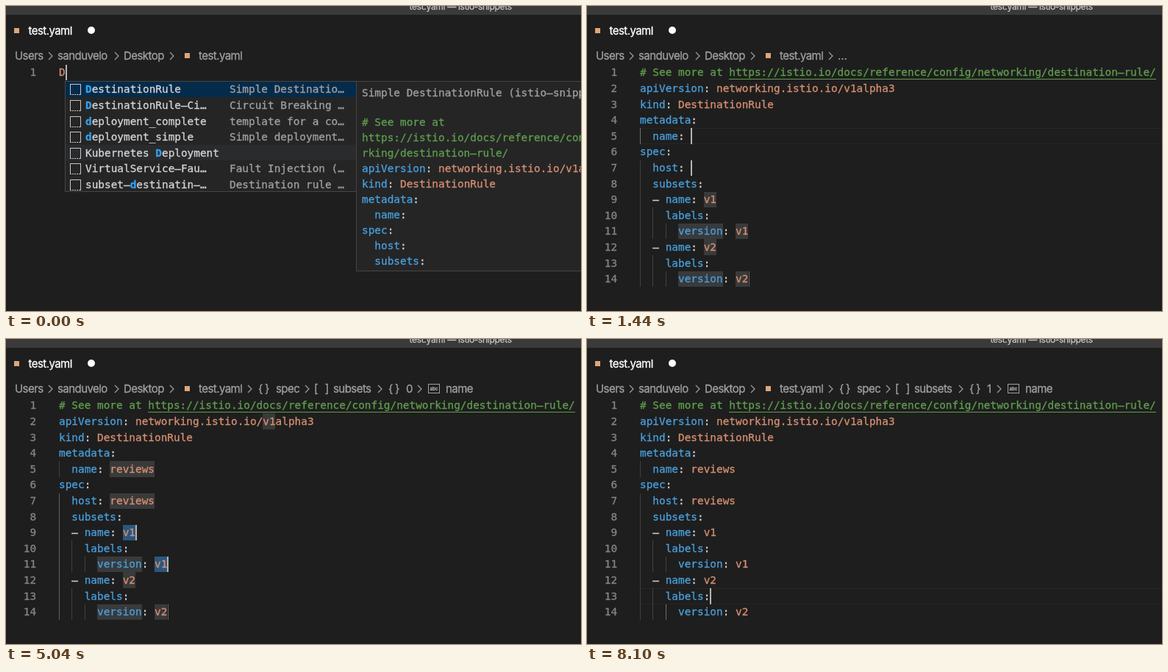
An HTML page with a canvas for the animation above (8160 ms loop, 782 px wide and 415 px high).

```html
<!DOCTYPE html>
<html lang="en">
<head>
<meta charset="utf-8">
<title>YAML snippet editor</title>
<style>
html, body { margin: 0; width: 100%; height: 100%; overflow: hidden; background: #1e1e1e; }
canvas { display: block; }
</style>
</head>
<body>
<canvas id="stage" width="782" height="415"></canvas>
<script>
const ctx = document.getElementById('stage').getContext('2d');
const LOOP = 8160, CELL = 8.668, ROW = 21.6, LEFT = 72, TOP = 79.4;
const CODE = '14.4px "DejaVu Sans Mono", monospace';
const UI = '15px Inter, sans-serif';
const BLUE = '#489fdc', ORANGE = '#d68f70', GREEN = '#5f9d4c', WHITE = '#d4d4d4', GREY = '#a0a0a0';
const MARK = '#393a3b';

// Moments at which the editor changes state
const T = { insert: 420, link: 780, crumbs: 2400, v1: 4740, v2: 6240, done: 7620, up: 7980 };
const KEYS = [2280, 2460, 2640, 2940, 3120, 3240, 3300];

const colX = col => LEFT + col * CELL;
const rowY = row => Math.ceil(TOP + (row - 1) * ROW);
const rowH = row => rowY(row + 1) - rowY(row);
const baseline = (first, i) => Math.ceil(first + i * ROW);

function rect(x, y, w, h, color) {
  ctx.fillStyle = color;
  ctx.fillRect(x, y, w, h);
}

function frame(x, y, w, h, color) {
  ctx.strokeStyle = color;
  ctx.lineWidth = 1;
  ctx.strokeRect(x + .5, y + .5, w - 1, h - 1);
}

function path(points, color, width) {
  ctx.beginPath();
  points.forEach(([x, y]) => ctx.lineTo(x, y));
  ctx.strokeStyle = color;
  ctx.lineWidth = width;
  ctx.stroke();
}

// A hairline stroke gives the slightly heavy look of smoothed text
function text(str, x, y, color, font, spacing = 0) {
  ctx.font = font;
  ctx.letterSpacing = spacing + 'px';
  ctx.fillStyle = ctx.strokeStyle = color;
  ctx.lineWidth = .3;
  ctx.fillText(str, x, y);
  ctx.strokeText(str, x, y);
}

const label = (str, x, y, color) => text(str, x, y, color, UI, -.55);

// The editor font has a wide hyphen
const code = (str, x, y, color, weight = '') =>
  text(str.replace(/-/g, '–'), x, y, color, weight + CODE);

// Draws one line of YAML with syntax colours
function yaml(line, x, y) {
  const parts = line.match(/^(\s*)(- )?(\w+)(:)( .*)?$/);
  if (!parts) return code(line, x, y, GREEN);
  const colors = [WHITE, WHITE, BLUE, WHITE, ORANGE];
  parts.slice(1).forEach((part = '', i) => {
    code(part, x, y, colors[i]);
    x += part.length * CELL;
  });
}

function mark(row, col, len, color = MARK) {
  rect(Math.round(colX(col)), rowY(row), Math.round(len * CELL), rowH(row), color);
}

function activeLine(row) {
  rect(LEFT, rowY(row), 710, 1, '#262626');
  rect(LEFT, rowY(row + 1) - 1, 710, 1, '#262626');
}

function guide(col, from, to, color = '#404040') {
  rect(Math.round(colX(col)), rowY(from), 1, rowY(to + 1) - rowY(from), color);
}

function caret(row, col) {
  rect(Math.round(colX(col)), rowY(row), 2, rowH(row), '#b4b5b3');
}

function squiggle(row, col, len) {
  const points = [];
  for (let x = 0, i = 0; x <= len * CELL; x += 2.5, i++)
    points.push([colX(col) + x, rowY(row) + (i % 2 ? 18.5 : 21)]);
  path(points, '#3d97e8', 1.3);
}

function crumb(kind, x) {
  if (kind === '>') path([[x, 63], [x + 5, 68], [x, 73]], GREY, 1.2);
  else if (kind === 'abc') {
    frame(x, 61, 16, 13, GREY);
    text('abc', x + 2.5, 70, GREY, 'bold 6px Inter, sans-serif');
  } else if (/[{[]/.test(kind)) text(kind, x, 73, GREY, UI, 2.5);
  else label(kind, x, 73, GREY);
}

function crumbTail(t) {
  if (t < T.link) return [];
  if (t < T.crumbs) return [['>', 329], ['…', 341]];
  if (t < T.v1 + 120)
    return [['>', 329], ['{}', 343], ['metadata', 367], ['>', 438], ['abc', 452], ['name', 476]];
  const second = t >= T.v2 + 120, shift = second ? -2 : 0;
  return [['>', 329], ['{}', 343], ['spec', 367], ['>', 407], ['[ ]', 419], ['subsets', 445],
    ['>', 506], ['{}', 520], [second ? '1' : '0', 544], ['>', 560 + shift],
    ['abc', 574 + shift], ['name', 598 + shift]];
}

function chrome(t) {
  rect(0, 0, 782, 415, '#1e1e1e');
  rect(0, 0, 782, 12, '#3a3a3b');
  text('test.yaml — istio-snippets', 548.5, 5, '#c4c4c4', '12px Inter, sans-serif', -.3);
  rect(11, 30, 7, 7, '#e0a578');
  label('test.yaml', 30.5, 39, '#ffffff');
  ctx.beginPath();
  ctx.arc(116, 33, 5, 0, 7);
  ctx.fillStyle = '#ffffff';
  ctx.fill();
  [['Users', 12], ['>', 58], ['sanduvelo', 70], ['>', 148], ['Desktop', 160], ['>', 223],
    ['test.yaml', 262], ...crumbTail(t)].forEach(c => crumb(...c));
  rect(243, 64, 7, 7, '#e0a578');
}

const SUGGESTIONS = [
  ['DestinationRule', 'Simple Destinatio…', 0],
  ['DestinationRule-Ci…', 'Circuit Breaking …', 0],
  ['deployment_complete', 'template for a co…', 0],
  ['deployment_simple', 'Simple deployment…', 0],
  ['Kubernetes Deployment', '', 11],
  ['VirtualService-Fau…', 'Fault Injection (…', -1],
  ['subset-destinatin-…', 'Destination rule …', 7]
];

const DOCS = ['# See more at', 'https://istio.io/docs/reference/config/netwo', 'rking/destination-rule/',
  'apiVersion: networking.istio.io/v1alpha3', 'kind: DestinationRule', 'metadata:', '  name:',
  'spec:', '  host:', '  subsets:'];

function popup() {
  code('1', 41.2 - CELL, 95, '#858585');
  code('D', LEFT, 95, ORANGE);
  caret(1, 1);
  rect(80, 102, 397, 151, '#252526');
  rect(81, 103, 395, 21, '#052b4b');
  rect(81, 189, 395, 21, '#2a2b2c');
  SUGGESTIONS.forEach(([name, detail, hit], i) => {
    const y = baseline(118, i);
    frame(87, y - 12, 15, 15, '#c5c5c5');
    for (let x = 89; x < 101; x += 3) rect(x, y + 2, 1, 1, '#252526');
    // The matched letter is drawn apart from the rest
    const rest = [...name].map((c, n) => n === hit ? ' ' : c).join('');
    code(rest, 108, y, WHITE);
    if (hit >= 0) code(name[hit], 108 + hit * CELL, y, '#35a0ee', 'bold ');
    code(detail, 304, y, GREY);
  });
  frame(80, 102, 397, 151, '#454545');
  rect(476, 102, 320, 259, '#252526');
  frame(476, 102, 320, 259, '#454545');
  code('Simple DestinationRule (istio-snippets)', 484, 123, GREY);
  DOCS.forEach((line, i) => yaml(line, 484, 163 + i * 21));
}

const version = n => [`  - name: v${n}`, '    labels:', `      version: v${n}`];

function editor(t) {
  const typed = KEYS.filter(k => t >= k).length;
  const word = 'reviews'.slice(0, typed);
  const pick = t < T.v1 ? 0 : t < T.v2 ? 1 : 2;
  const finished = t >= T.done;

  // The caret blinks once a second, starting again after each action
  const last = [T.insert, ...KEYS, T.v1, T.v2, T.done, T.up].filter(k => t >= k).pop();
  const carets = finished ? (t < T.up ? [[14, 17]] : [[13, 11]])
    : pick ? [[6 + pick * 3, 12], [8 + pick * 3, 17]]
    : [[5, 8 + typed], [7, 8 + typed]];

  if (finished || !pick) activeLine(carets[0][0]);

  if (!finished) {
    [5, 7].forEach(row => mark(row, 8, typed));
    [1, 2].forEach(n => {
      const row = 6 + n * 3, color = n === pick ? '#2b577f' : MARK;
      mark(row, 10, 2, color);
      mark(row + 2, 6, 7);
      mark(row + 2, 15, 2, color);
    });
    rect(220, rowY(14), 1, rowH(14), '#626262');
    if (pick === 1) mark(2, 32, 2);
  }

  guide(0, 5, 5, pick ? '#404040' : '#707070');
  guide(0, 7, 14, pick && !finished ? '#606060' : '#404040');
  [10, 13].forEach(row => {
    guide(2, row, row + 1);
    guide(4, row + 1, row + 1, finished && row === 13 ? '#707070' : '#404040');
  });

  const lines = ['# See more at https://istio.io/docs/reference/config/networking/destination-rule/',
    'apiVersion: networking.istio.io/v1alpha3', 'kind: DestinationRule', 'metadata:',
    '  name: ' + word, 'spec:', '  host: ' + word, '  subsets:', ...version(1), ...version(2)];
  lines.forEach((line, i) => {
    const y = baseline(95, i), number = String(i + 1);
    code(number, 41.2 - number.length * CELL, y, '#858585');
    yaml(line, LEFT, y);
  });
  if (t >= T.link) rect(193, 99, 581, 1, GREEN);
  if (typed > 2 && typed < 7) [5, 7].forEach(row => squiggle(row, 8, typed));
  if ((t - last) % 1000 < 500) carets.forEach(c => caret(...c));
}

function draw() {
  const t = performance.now() % LOOP;
  chrome(t);
  if (t < T.insert) popup();
  else editor(t);
  requestAnimationFrame(draw);
}
draw();
</script>
</body>
</html>
```
